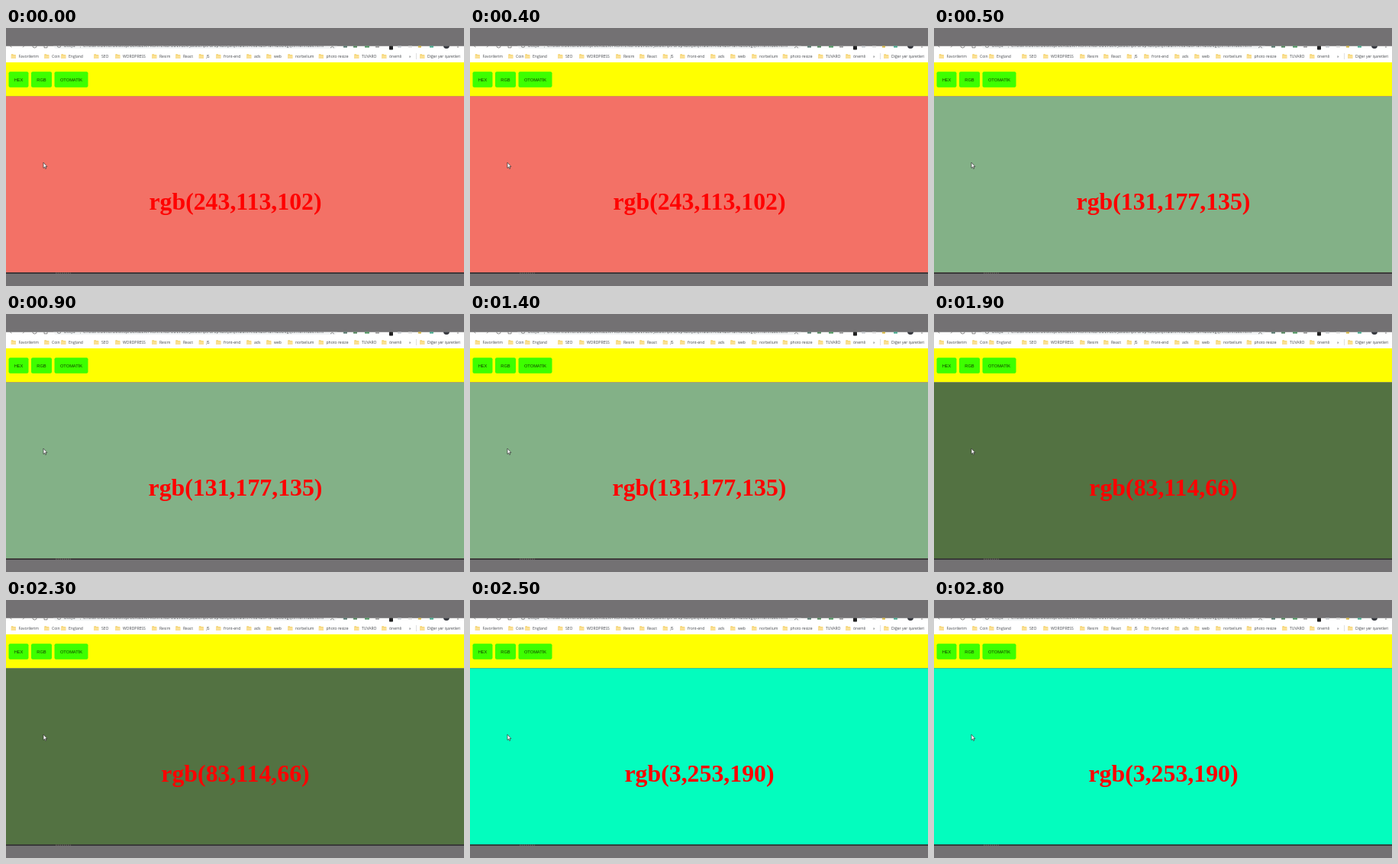
These frames come from a looping animation (600x338 px, 2.9 s). An HTML page:

```html
<!DOCTYPE html>
<html lang="tr">
<head>
<meta charset="utf-8">
<title>Renk değiştirici</title>
<style>
  html, body { margin: 0; width: 100%; height: 100%; overflow: hidden; background: #737173; }
  svg { display: block; width: 100%; height: 100%; }
  .chrome { font-family: "Open Sans", "Noto Sans", sans-serif; font-size: 5.05px; fill: #45484c; }
  .button text { font: 5.7px "Liberation Sans", Arial, sans-serif; fill: #123800; text-anchor: middle; }
  .button rect { fill: #3dff00; }
  .color text { font: bold 31.8px "Liberation Serif", "Times New Roman", serif; fill: #f00; text-anchor: middle; }
  .color { animation: 2900ms step-end infinite; }
  .second { animation-name: second; }
  .third { animation-name: third; }
  .fourth { animation-name: fourth; }
  @keyframes second { 0% { opacity: 0 } 17.24%, 100% { opacity: 1 } }
  @keyframes third { 0% { opacity: 0 } 51.72%, 100% { opacity: 1 } }
  @keyframes fourth { 0% { opacity: 0 } 86.2%, 100% { opacity: 1 } }
</style>
</head>
<body>
<svg viewBox="0 0 600 338" preserveAspectRatio="none">
  <defs>
    <clipPath id="window"><rect y="23.5" width="600" height="298"/></clipPath>
    <g id="folder">
      <path d="M0 .6h2.4l.7.8H6v5H0z" fill="#f3d16b"/>
      <path d="M0 2.2h6v4.2H0z" fill="#fbe093"/>
    </g>
  </defs>
  <rect width="600" height="338" fill="#737173"/>
  <g clip-path="url(#window)">
    <rect y="23.5" width="600" height="22" fill="#fff"/>
    <g class="chrome">
      <path d="M62 23.5H434q-1 3.6-4 3.6H66q-3 0-4-3.6" fill="#f1f3f4"/>
      <g fill="none" stroke="#666" stroke-width=".8">
        <path d="M5 23l2.3 2.4M22 25.4l2.3-2.4M50 22v3.8h4V22"/>
        <circle cx="37.5" cy="23.3" r="2.7"/>
        <circle cx="69.5" cy="23" r="2.4"/>
        <path d="M97.5 20v6" stroke="#bbb"/>
        <path d="M425 26l2.4-1.8 2.4 1.8"/>
      </g>
      <text x="76" y="25.2">Dosya</text>
      <text x="101" y="25.2" textLength="315">C:/Users/Deniz/Desktop/DERSLER/FRONTEND/ÖDEVLER/Javascript/Grup%20Çalışmaları/Arka%20Plan%20Değiştirme/index.html</text>
      <g id="tools"></g>
      <g id="bookmarks"></g>
    </g>
    <rect y="45" width="600" height="44.5" fill="#ff0"/>
    <g id="buttons"></g>
    <g class="color"><rect y="89.5" width="600" height="231" fill="#f37166"/><text x="300.5" y="238">rgb(243,113,102)</text></g>
    <g class="color second"><rect y="89.5" width="600" height="231" fill="#83b187"/><text x="300.5" y="238">rgb(131,177,135)</text></g>
    <g class="color third"><rect y="89.5" width="600" height="231" fill="#537242"/><text x="300.5" y="238">rgb(83,114,66)</text></g>
    <g class="color fourth"><rect y="89.5" width="600" height="231" fill="#03fdbe"/><text x="300.5" y="238">rgb(3,253,190)</text></g>
    <rect y="320.3" width="600" height="1.5" fill="#252528"/>
    <path d="M65 321.1h20" stroke="#77736b" stroke-width="1" stroke-dasharray="1.6 1.1"/>
    <path d="M49 176.2v7.3l1.6-1.5 1.1 2.5 1.1-.5-1.1-2.4h2.2z" fill="#fff" stroke="#222" stroke-width=".65"/>
  </g>
</svg>
<script>
  const fill = (id, markup) => { document.getElementById(id).innerHTML = markup.join(""); };

  const bookmarks = [
    [16.5, "Favorilerim"], [60, "Coin"], [82, "England"], [125, "SEO"], [153, "WORDPRESS"],
    [201, "Resim"], [232, "React"], [262.5, "JS"], [285, "front-end"], [325, "ads"], [351, "web"],
    [379, "norbelium"], [419.5, "photo resize"], [466, "TUVARO"], [502, "önemli"], [552, "Diğer yer işaretleri"]
  ];
  fill("bookmarks", [
    ...bookmarks.map(([x, label]) =>
      `<use href="#folder" x="${x - 9.7}" y="33.6"/><text x="${x}" y="38.9">${label}</text>`),
    `<text x="528" y="38.9">»</text>`,
    `<path d="M537.5 33v8" stroke="#ccc" stroke-width=".6"/>`
  ]);

  const tools = [
    [442, 5, "#55766c"], [455, 5, "#50845b"], [470, 6, "#4f9660"], [484, 5, "#999"],
    [513, 5, "#c9cdd1"], [527, 5, "#ddd"], [540, 4, "#d7b844"], [555, 5, "#45a98d"]
  ];
  fill("tools", [
    ...tools.map(([x, width, color]) => `<rect x="${x}" y="22" width="${width}" height="3.6" fill="${color}"/>`),
    `<rect x="502" y="23" width="5" height="5.5" rx=".7" fill="#222"/>`,
    `<circle cx="577" cy="23" r="4" fill="#383a40"/>`,
    `<circle cx="592" cy="25" r=".7" fill="#555"/>`
  ]);

  const buttons = [[3.5, 26, "HEX"], [33, 27, "RGB"], [63.5, 44, "OTOMATİK"]];
  fill("buttons", buttons.map(([x, width, label]) =>
    `<g class="button"><rect x="${x}" y="57.3" width="${width}" height="20.4" rx="2"/>` +
    `<text x="${x + width / 2}" y="69.8">${label}</text></g>`));
</script>
</body>
</html>
```
